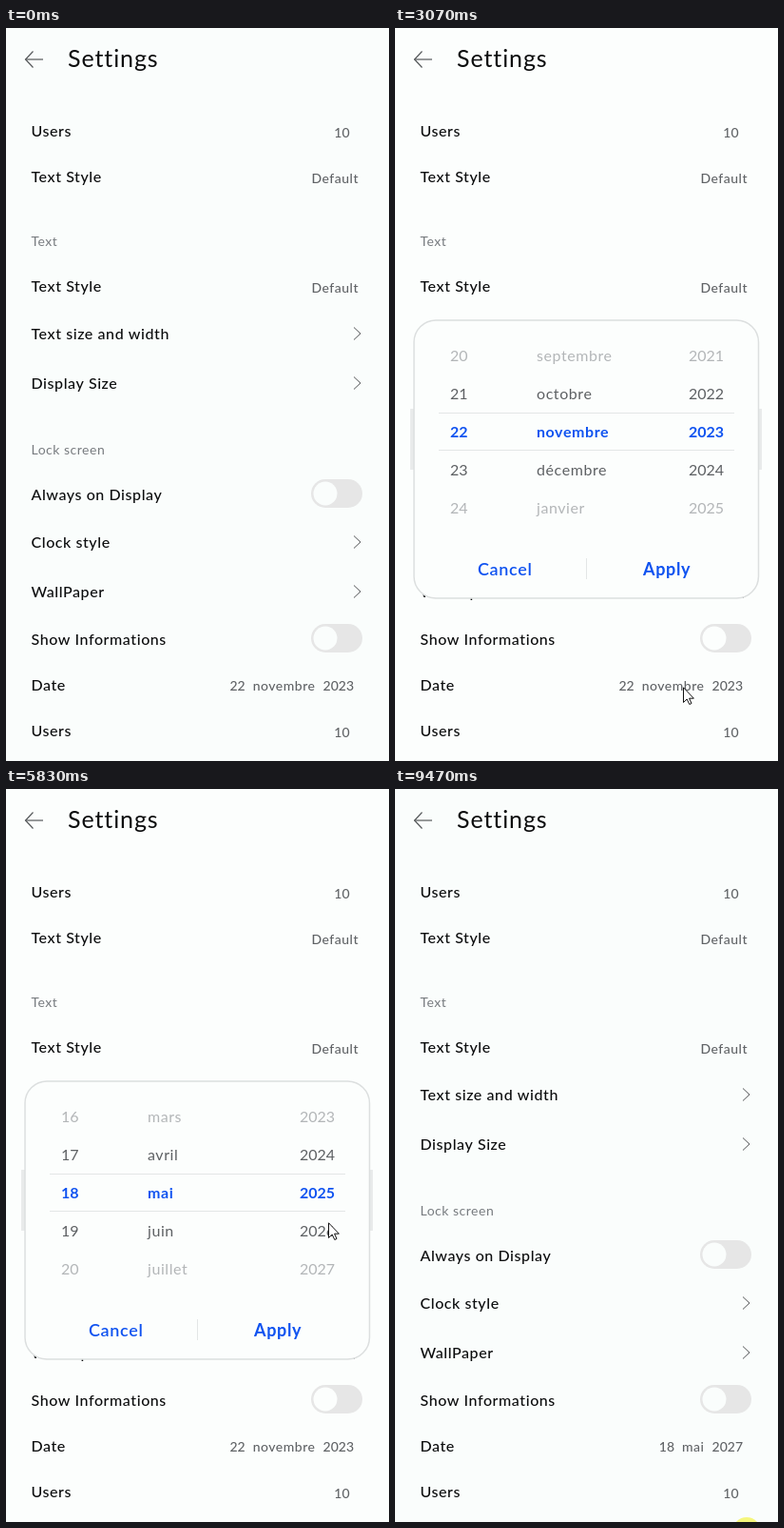
An HTML page with a canvas that plays this animation: 403 by 770 pixels, repeating every 9610 ms.

```html
<!DOCTYPE html>
<html lang="en">
<head>
<meta charset="utf-8">
<title>Settings</title>
<style>
html, body { margin: 0; width: 100%; height: 100%; overflow: hidden; background: #fafdfc; }
canvas { display: block; width: 403px; height: 770px; }
</style>
</head>
<body>
<canvas id="stage"></canvas>
<script>
const W = 403, H = 770, LOOP = 9610, DISSOLVE = 90;
const canvas = document.getElementById('stage');
const ctx = canvas.getContext('2d');
const dpr = window.devicePixelRatio || 1;
canvas.width = W * dpr;
canvas.height = H * dpr;

const INK = '#0c0d0e', GREY = '#606366', PALE = '#777b7f';
const BLUE = '#1053f0', LINE = '#e3e6e6', STROKE = '#55585a';
const MONTHS = ['janvier', 'février', 'mars', 'avril', 'mai', 'juin', 'juillet',
  'août', 'septembre', 'octobre', 'novembre', 'décembre'];

const ROW_HEIGHT = { value: 48, date: 48, toggle: 48, chevron: 52 };
const ROWS = [
  ['value', 'Users', '10'], ['value', 'Text Style', 'Default'],
  ['section', 'Text'], ['value', 'Text Style', 'Default'],
  ['chevron', 'Text size and width'], ['chevron', 'Display Size'],
  ['section', 'Lock screen'], ['toggle', 'Always on Display'],
  ['chevron', 'Clock style'], ['chevron', 'WallPaper'],
  ['toggle', 'Show Informations'], ['date', 'Date'], ['value', 'Users', '10']
];

// Each column moves by a fixed step whenever one of its times is reached.
const COLUMNS = [
  { x: 58, from: 22, step: -2, times: [4850, 5020], label: String },
  { x: 149, from: 10, step: 3, times: [3835, 3930], label: i => MONTHS[i % 12] },
  { x: 309, from: 2023, step: 2, times: [5710, 5835], label: String }
];

const ENTRY = { x: 325, y: 770 };
const MOVES = [
  { start: 940, end: 1500, x: 305, y: 696, bend: 12 },
  { start: 3040, end: 3420, x: 183, y: 477 },
  { start: 3590, end: 3680, x: 180, y: 444 },
  { start: 4300, end: 4800, x: 68, y: 455 },
  { start: 5470, end: 5590, x: 339, y: 455 },
  { start: 6090, end: 6210, x: 293, y: 479 },
  { start: 6320, end: 7090, x: 288, y: 573, bend: -100 },
  { start: 7950, end: 8670, x: 362, y: 770 }
];

const ramp = (t, a, b) => Math.min(1, Math.max(0, (t - a) / (b - a)));
const ease = k => k * k * (3 - 2 * k);
const mix = (a, b, k) => a + (b - a) * k;

// Draws a string and returns its width.
function text(s, x, y, { size = 16, color = INK, weight = 500, align = 'left' } = {}) {
  ctx.font = `${weight} ${size}px Lato, sans-serif`;
  ctx.letterSpacing = /^\d+$/.test(s) ? '0px' : `${size * 0.036}px`;
  ctx.textAlign = align;
  ctx.fillStyle = color;
  ctx.fillText(s, x, y);
  return ctx.measureText(s).width;
}

function stroke(points, color, width = 1) {
  ctx.beginPath();
  points.forEach(([x, y]) => ctx.lineTo(x, y));
  ctx.strokeStyle = color;
  ctx.lineWidth = width;
  ctx.stroke();
}

function disc(x, y, r, color) {
  ctx.beginPath();
  ctx.arc(x, y, r, 0, Math.PI * 2);
  ctx.fillStyle = color;
  ctx.fill();
}

function panel(x, y, w, h, r, color) {
  ctx.beginPath();
  ctx.roundRect(x, y, w, h, r);
  ctx.fillStyle = color;
  ctx.fill();
}

function faded(alpha, draw) {
  if (alpha <= 0) return;
  const before = ctx.globalAlpha;
  ctx.globalAlpha = before * alpha;
  draw();
  ctx.globalAlpha = before;
}

function dateValue(y, ...words) {
  let right = 366;
  for (const word of words.reverse()) {
    right -= text(word, right, y, { size: 14, color: GREY, align: 'right' }) + 8;
  }
}

const controls = {
  value(y, bg, applied, s) {
    const right = s === 'Default' ? 371 : 361.5;
    text(s, right, y + 7, { size: 14, color: GREY, align: 'right' });
  },
  date(y, bg, applied) {
    faded(1 - applied, () => dateValue(y + 6, '22', 'novembre', '2023'));
    faded(applied, () => dateValue(y + 6, '18', 'mai', '2027'));
  },
  chevron(y) {
    stroke([[366, y - 6.5], [373, y], [366, y + 6.5]], STROKE);
  },
  toggle(y, bg) {
    panel(321, y - 16, 54, 30, 15, '#e6e6e6');
    disc(336, y - 1, 12.5, bg);
  }
};

function page(bg, applied) {
  stroke([[39, 33], [20.5, 33]], STROKE, 1.2);
  stroke([[28.5, 24.5], [20.5, 33], [28.5, 41.5]], STROKE, 1.2);
  text('Settings', 65, 41, { size: 25, weight: 400 });

  let top = 84;
  for (const [kind, label, value] of ROWS) {
    if (kind === 'section') {
      text(label, 26.5, top + 49, { size: 14, color: PALE, weight: 400 });
      top += 67;
      continue;
    }
    const y = top + ROW_HEIGHT[kind] / 2;
    text(label, 26.5, y + 6);
    controls[kind](y, bg, applied, value);
    top += ROW_HEIGHT[kind];
  }
}

function rows({ x, label }, value) {
  for (let i = -2; i <= 2; i++) {
    const far = Math.abs(i);
    const color = [BLUE, '#5d6063', '#b3b6b8'][far];
    text(label(value + i), x, 430 + i * 40, { color, weight: far ? 400 : 700 });
  }
}

function picker(t, column) {
  const { from, step, times } = column;
  const count = times.filter(time => t >= time).length;
  const value = from + step * count;
  const k = count ? ramp(t, times[count - 1], times[count - 1] + DISSOLVE) : 1;
  faded(1 - k, () => rows(column, value - step));
  faded(k, () => rows(column, value));
}

function dialog(t) {
  ctx.fillStyle = '#e9ebeb';
  ctx.fillRect(16, 400, 370, 64);
  panel(20, 307, 362.5, 292, 23, '#fcfefd');
  ctx.strokeStyle = '#dcdfdf';
  ctx.lineWidth = 1.5;
  ctx.stroke();
  for (const y of [404.5, 443.5]) stroke([[46, y], [357, y]], LINE);
  stroke([[201.5, 557], [201.5, 579]], LINE);
  COLUMNS.forEach(column => picker(t, column));
  text('Cancel', 87, 575, { size: 18, color: BLUE, weight: 600 });
  text('Apply', 261, 575, { size: 18, color: BLUE, weight: 700 });
}

function cursorAt(t) {
  let { x, y } = ENTRY;
  for (const move of MOVES) {
    if (t < move.start) break;
    const k = ease(ramp(t, move.start, move.end));
    x = mix(x, move.x, k) + (move.bend || 0) * Math.sin(Math.PI * k);
    y = mix(y, move.y, k);
  }
  return [Math.round(x), Math.round(y)];
}

function cursor(t) {
  ctx.save();
  ctx.translate(...cursorAt(t));
  ctx.beginPath();
  [[0.5, 0.8], [0.5, 16.5], [4.2, 13], [6.8, 18.5], [9, 17.5], [6.6, 12.2], [11.4, 12.2]]
    .forEach(([x, y]) => ctx.lineTo(x, y));
  ctx.closePath();
  ctx.fillStyle = '#fff';
  ctx.fill();
  ctx.strokeStyle = '#111';
  ctx.lineWidth = 1;
  ctx.stroke();
  ctx.restore();
}

function draw(t) {
  const closing = ramp(t, 7615, 7790);
  const open = ramp(t, 2200, 2480) * (1 - closing);
  const bg = open > 0.5 ? '#fcfefd' : '#fafdfc';
  ctx.setTransform(dpr, 0, 0, dpr, 0, 0);
  ctx.fillStyle = bg;
  ctx.fillRect(0, 0, W, H);
  page(bg, closing);
  faded(open, () => dialog(t));
  if (t >= 9470) disc(370, 780, 15, '#f5f67c');
  cursor(t);
}

const start = performance.now();
function tick() {
  draw((performance.now() - start) % LOOP);
  requestAnimationFrame(tick);
}
tick();
</script>
</body>
</html>
```
